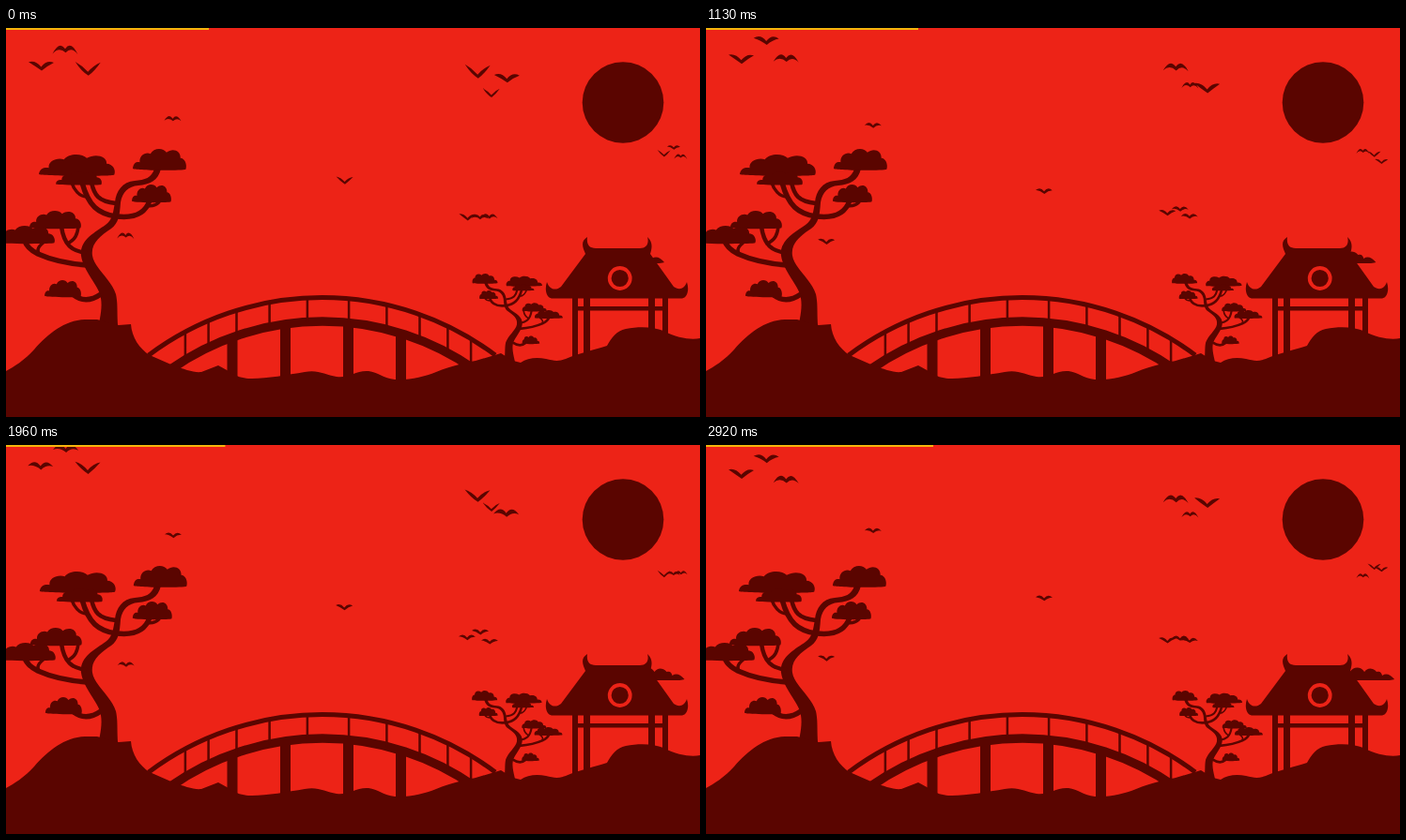
An HTML page for the animation above (2.96 s loop, 739x415 px).

```html
<!DOCTYPE html>
<html lang="en">
<head>
<meta charset="utf-8">
<title>Red garden</title>
<style>
  html, body { margin: 0; width: 100%; height: 100%; overflow: hidden; background: #ed2317; }
  svg { display: block; width: 739px; height: 415px; }
  .line { fill: none; stroke: #5a0500; }
</style>
</head>
<body>
<svg viewBox="0 0 739 415" fill="#5a0500">
  <defs>
    <path id="leaf" d="M0,28C1,20 7,18 13,19C12,9 24,4 33,7C39,-2 57,-2 63,5C74,-2 90,2 89,13C97,13 102,22 99,29C94,31 8,31 0,28Z"/>
  </defs>
  <circle cx="657" cy="79.5" r="43.3"/>
  <path id="birds"/>

  <!-- bridge -->
  <path class="line" stroke-width="5" d="M152,349A308,308 0 0 1 521,349"/>
  <path class="line" stroke-width="9.5" d="M174,365A282,282 0 0 1 500,365"/>
  <path class="line" stroke-width="2.5" id="posts"/>
  <path class="line" stroke-width="11" d="M241,328V380M297.5,317V380M364.5,315V380M420.5,325V380"/>

  <!-- pavilion -->
  <path id="cloud" d="M0,14V6C4,-1 12,-1 16,5C19,1 24,0 29,5C33,4 34,6 35,9C39,6 44,8 48,13C46,14 40,14 36,14Z"/>
  <path d="M615,236C613,230 614,226 619,223C618,231 621,235 628,235H675C682,235 685,230 683,223C689,228 688,235 686,241L711,276C715,279 722,280 725,271C728,280 725,288 720,288.5H581C576,288 573,280 576,271C579,280 586,280 591,276L617,241Z"/>
  <circle cx="653.7" cy="267" r="11" fill="none" stroke="#ed2317" stroke-width="3.8"/>
  <path d="M603,287h6v68h-6zM615,287h7v68h-7zM684,287h7v45h-7zM699,287h6v45h-6zM606,297h96v4.5h-96z"/>

  <!-- large tree, and a smaller mirrored one -->
  <g id="tree">
    <path d="M94,335C102,306 103,294 100,284C96,272 82,258 80,243C78,226 95,218 106,210C114,204 114,196 116,186C117,174 124,164 137,163C148,162 155,160 158,150L165,150C162,163 153,167 141,168C130,169 124,175 122,186C121,200 120,208 112,214C100,222 90,230 92,243C94,256 112,268 117,284C120,298 117,306 121,335Z"/>
    <path class="line" stroke-width="5.5" d="M117,201C98,198 88,190 81,165M118,201C135,203 148,199 153,184M86,253C60,251 45,246 34,241C28,238 22,234 20,227M101,284C88,293 78,290 71,284"/>
    <path class="line" stroke-width="4.5" d="M117,187C98,185 94,178 91,165M86,240C70,238 62,232 59,212"/>
    <path class="line" stroke-width="3.5" d="M86,180C78,180 72,172 70,165M150,190C158,190 163,188 164,183M65,230C74,226 76,220 77,212M36,242C31,236 36,232 42,227"/>
    <g id="leaves">
      <use href="#leaf" transform="translate(35 135) scale(.81 .75)"/>
      <use href="#leaf" transform="translate(53 153) scale(.49 .48)"/>
      <use href="#leaf" transform="translate(135 129) scale(.57 .75)"/>
      <use href="#leaf" transform="translate(134 167) scale(.42 .63)"/>
      <use href="#leaf" transform="translate(25 195) scale(.55 .63)"/>
      <use href="#leaf" transform="translate(-11 211) scale(.63 .63)"/>
      <use href="#leaf" transform="translate(41 269) scale(.39 .6)"/>
    </g>
  </g>
  <use href="#tree" transform="translate(587.7 200.7) scale(-.475 .475)"/>

  <path d="M0,415V366C8,362 20,354 30,343C45,326 62,312 84,311L97,311L120,317L133,316C134,330 142,342 153,349L178,360C190,364 200,368 208,367L226,360L237,366C245,372 252,374 262,374C278,374 300,370 318,367C332,364 340,370 352,372C365,374 372,365 386,366C396,367 402,374 414,375C430,376 445,372 458,367C475,360 490,357 500,355L527,347L540,355L548,357C555,352 565,351 575,353C583,355 588,356 596,353C610,347 628,343 640,339C645,330 650,323 660,321C675,318 690,319 700,323C715,331 730,333 739,331V415Z"/>
  <rect id="bar" height="2" fill="#f6b40c"/>
</svg>
<script>
const $ = id => document.getElementById(id);
const LOOP = 2960, STEP = 41.69, FLAP = 1.79, BOB = 3.58;
const wave = (t, peak, period) => Math.cos((t - peak) * 2 * Math.PI / period);

// Within a flock, the lowest moment and the wings-up moment shift evenly from bird to bird.
const flock = (size, low, lowShift, up, upShift, ...spots) =>
  spots.map(([x, y], i) => ({ x, y, size, low: low + i * lowShift, up: up + i * upShift }));

const birds = [
  flock(13.5, .3, -.1, 1.45, -.73, [37, 31], [64, 13], [86, 34]),
  flock(13.5, 2.55, -.6, 0, -.37, [501, 49], [533, 62]),
  flock(9, 2.9, 0, .06, 0, [516, 67]),
  flock(9, .95, .53, .62, .95, [178, 97], [360, 168], [128, 227]),
  flock(9, 2.87, -.25, .6, .9, [505, 199], [491, 202], [515, 204]),
  flock(7, 2.55, -.8, .1, -.55, [700, 135], [711, 132], [719, 137])
].flat();

function birdPath({ x, y, size, low, up }, t) {
  const w = wave(t, up, FLAP);
  const cx = x + w * size * .09;
  const cy = y + size * (.73 * wave(t, low, BOB) - .13 * w);
  const p = (u, v) => `${(cx + u * size).toFixed(2)},${(cy + v * size).toFixed(2)} `;
  const tip = -.05 - .4 * w, bend = -.5 + .35 * w, body = .1 + .25 * w;
  return 'M' + p(-1, tip) + 'Q' + p(-.45, bend) + p(0, body) +
    'Q' + p(.45, bend) + p(1, tip + .06) +
    'Q' + p(.5, bend + .48) + p(.04, body + .3) +
    'Q' + p(-.5, bend + .48) + p(-1, tip) + 'Z';
}

// Railing posts stand closer together towards both ends.
let posts = '';
for (let k = -4.5; k < 5; k++) {
  const x = 343 + k * (45.5 - 2.6 * Math.abs(k)), d = (x - 336.5) ** 2;
  posts += `M${x},${288 + d / 600}V${314 + d / 555}`;
}
$('posts').setAttribute('d', posts);

function draw(now) {
  const step = Math.min(70, Math.floor(now % LOOP / STEP + .1));
  const t = step / 24;
  $('birds').setAttribute('d', birds.map(b => birdPath(b, t)).join(''));
  $('leaves').setAttribute('transform', `translate(${Math.sin(t * 1.1)} 0)`);
  $('cloud').setAttribute('transform', `translate(${653 + 11 * t} 237)`);
  $('bar').setAttribute('width', 216 + 8.9 * t);
}

const start = performance.now();
function tick() {
  draw(performance.now() - start);
  requestAnimationFrame(tick);
}
tick();
</script>
</body>
</html>
```
